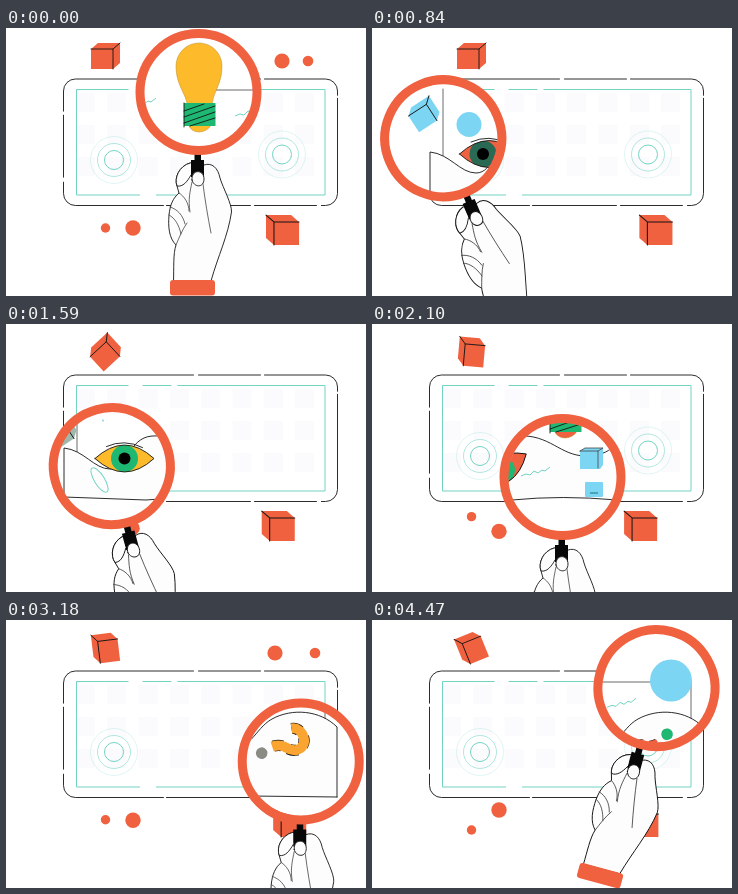
An HTML page that plays this animation: 360x268 px, repeating every 4.5 s.

```html
<!DOCTYPE html>
<html lang="en">
<head>
<meta charset="utf-8">
<title>Magnifier search</title>
<style>
html, body { margin: 0; width: 100%; height: 100%; overflow: hidden; background: #fff; }
svg { display: block; width: 100%; height: 100%; }
.ink { fill: none; stroke: #151515; stroke-width: .9; stroke-linecap: round; stroke-linejoin: round; }
.soft { stroke: #444; stroke-width: .8; }
.teal { fill: none; stroke: #72d3c3; stroke-width: 1; }
.skin { fill: #fdfdfe; }
.red { fill: #f0613f; }
.blue { fill: #7cd5f3; }
</style>
</head>
<body>
<svg viewBox="0 0 360 268">
  <defs>
    <clipPath id="lensClip"><circle id="clipDisc" r="54.5"/></clipPath>
    <path id="almond" d="M-29.5 0Q0-27 29.5 0Q0 27-29.5 0Z"/>
    <clipPath id="eyeClip"><use href="#almond"/></clipPath>
    <path id="cubeBody" d="M-14.5-7L-7.5-13H14.5V7L7.5 13H-14.5Z"/>
    <path id="cubeEdges" class="ink" d="M-14.5-7H7.5V13M7.5-7L14.5-13"/>
    <path id="wiggle" class="teal" d="M0 5L5 3L9 4L13 0L17 2L21-1L24 0L29-4"/>
    <path id="curl" d="M-14-14C-12-26 9-26 8-12C7-2-3-4-3 10"/>
  </defs>

  <g id="tiles" fill="#fbfbfd"></g>
  <rect class="ink" x="57.5" y="51" width="274" height="126.500" rx="12" stroke-dasharray="118 5 62 4 84 3"/>
  <rect class="teal" x="70.5" y="61.5" width="248.500" height="105.500" stroke-dasharray="52 14 29 6 422 16 170 0"/>
  <g id="rings"></g>

  <g id="dots" class="red"></g>
  <g id="cubeA"><use href="#cubeBody" class="red"/><use href="#cubeEdges"/></g>
  <g id="cubeB"><g transform="scale(-1.14 1.15)"><use href="#cubeBody" class="red"/><use href="#cubeEdges"/></g></g>

  <g clip-path="url(#lensClip)">
    <rect width="360" height="268" fill="#fff"/>
    <path class="ink soft" d="M205 62H280M290 62H319V167M71 167V61"/>
    <use href="#wiggle" x="121" y="74"/>
    <use id="wave" href="#wiggle"/>
    <path class="ink skin" d="M58 173V124C78 126 88 145 104 145C122 145 122 114 146 112C178 110 188 132 214 132C246 132 248 109 266 99C286 88 314 90 331 107V177"/>
    <path class="ink" d="M58 173L140 176Q190 171 245 176L331 177"/>
    <use id="waveLow" href="#wiggle" x="149" y="147"/>
    <ellipse id="loop" class="teal" rx="5" ry="14" transform="translate(93.5 156) rotate(-32)"/>
    <g id="cubeC"><use id="cubeFill" href="#cubeBody"/><use href="#cubeEdges"/></g>
    <circle id="disc" class="blue" cx="97" cy="96.5"/>
    <circle class="blue" cx="299" cy="60.5" r="21"/>

    <g id="bulb">
      <path id="glass" d="M182 80C180 64 170 58 170 38A23 23 0 0 1 216 38C216 58 206 64 206 80V96Q201 104 193 104Q185 104 182 96Z" stroke="#b98a28" stroke-width=".5"/>
      <rect x="178" y="75" width="31.500" height="23" fill="#1eb872"/>
      <path class="ink" d="M178 83L198 76M178 89L209 78M178 95L209 84M184 98L209 90M178 75V99"/>
    </g>

    <g id="eye">
      <use id="white" href="#almond"/>
      <g clip-path="url(#eyeClip)"><g id="gaze"><circle id="iris" r="13.500"/><circle r="6"/></g></g>
      <use href="#almond" class="ink"/>
      <path class="ink" d="M-18-12Q0-20 18-11"/>
    </g>

    <g transform="translate(220 135)">
      <path class="blue" d="M-12-8L-7-11H11V6L8 10H-12Z"/>
      <path class="ink soft" d="M-12-8H6V9M6-8L11-11H-7L-12-8"/>
    </g>
    <g id="box"><rect class="blue" x="-9" y="-7.500" width="18" height="15" rx="1"/><path class="teal" d="M-4 3.500H4" style="stroke:#177"/></g>

    <g id="ask" fill="none">
      <use href="#curl" stroke="#151515" stroke-width="11.200" stroke-dasharray="9 7"/>
      <use id="hook" href="#curl" stroke-width="10"/>
      <circle id="point" cy="22" r="5.800"/>
    </g>
  </g>

  <!-- Drawn upright with the lens centre at 192 64. -->
  <g id="tool">
    <path class="ink skin" d="M198 137C206 134 212 140 214 150C217 160 226 176 225.5 184C222 208 212 228 205 253H167.500C168 240 167 226 170 217C163 210 162 199 163 187C164 177 167 170 173 165L171 158C168 150 173 138 184 135Z"/>
    <path d="M188.500 126H195V132H198V149H185V132H188.500Z" fill="#080808"/>
    <path class="ink skin" d="M184 135C173 138 168 150 171 158C177 159 181 154 185 147"/>
    <path class="ink skin" d="M186 152C185 141 198 141 198 151C198 160 188 160 186 152Z"/>
    <path class="ink soft" d="M186 154C184 164 182 171 184 184M197 156C199 172 202 190 205 205M173 165C178 168 183 175 183 183M163 187C169 190 173 197 175 206M164 179C171 181 177 187 179 196M181 195C176 202 173 210 170 217M167 253H205"/>
    <rect class="red" x="164" y="252" width="45" height="15.500" rx="3"/>
    <circle cx="192.500" cy="64" r="58.500" fill="none" stroke="#f0613f" stroke-width="9"/>
  </g>
</svg>
<script>
const LOOP = 4500;
const RED = [240, 97, 63], YELLOW = [253, 187, 44], GREEN = [30, 184, 114];
const PINE = [42, 105, 84], BLUE = [124, 213, 243], GREY = [136, 140, 130];

const $ = id => document.getElementById(id);
const set = (id, name, value) => $(id).setAttribute(name, value);
const place = (id, x, y, turn = 0, size = 1) =>
  set(id, "transform", `translate(${x} ${y}) rotate(${turn}) scale(${size})`);
const lerp = (a, b, k) => a + (b - a) * k;
const mix = (a, b, k) => `rgb(${a.map((v, i) => Math.round(lerp(v, b[i], k)))})`;
const ease = u => u < .5 ? 4 * u ** 3 : 1 - 4 * (1 - u) ** 3;
const ramp = (t, from, to) => ease(Math.min(1, Math.max(0, (t - from) / (to - from))));

// Resting poses of the magnifier: time, x, y, tilt.
const stops = [
  [100, 192, 64, 0], [960, 69.5, 111, -23], [1200, 64, 137, -22], [2100, 190, 153, 0],
  [2220, 190, 153, 0], [3100, 294, 141.5, 0], [3400, 297, 141.5, 0], [3920, 291, 70, 3], [4470, 284, 68, 15]
];

function pose(t) {
  const i = Math.max(1, stops.findIndex(s => s[0] >= t));
  const a = stops[i - 1], b = stops[i];
  const k = t > LOOP - 30 ? 1 : ramp(t, a[0], b[0]);
  return t > LOOP - 30 ? stops[stops.length - 1].slice(1) : [1, 2, 3].map(n => lerp(a[n], b[n], k));
}

for (let i = 0; i < 24; i++) {
  const x = 70 + (i % 8) * 31.3, y = 65 + Math.floor(i / 8) * 32;
  $("tiles").innerHTML += `<rect x="${x}" y="${y}" width="19" height="19"/>`;
}
for (const id of ["ringL", "ringR"]) {
  $("rings").innerHTML += `<g id="${id}" class="teal"><circle r="9.5"/>`
    + `<circle r="16.5" opacity=".55"/><circle r="23.5" opacity=".22"/></g>`;
}
for (const [id, r] of [["leftSmall", 4.7], ["leftBig", 7.7], ["rightBig", 7.6], ["rightSmall", 5.3]]) {
  $("dots").innerHTML += `<circle id="${id}" r="${r}"/>`;
}

function drawStage(t) {
  place("cubeA", 99.5, 28, -85 * ramp(t, 1080, 2100) - 27 * ramp(t, 2700, 3700));
  place("cubeB", 276.5 + 8 * Math.sin(2 * Math.PI * t / 2700), 202);

  const gone = ramp(t, 400, 750);
  const left = 1 - gone + ramp(t, 1350, 1700), right = 1 - gone + ramp(t, 2200, 2550);
  const bob = 10 * ramp(t, 800, 1600) * Math.cos(2 * Math.PI * (t - 1900) / 1700);
  const shift = 7 * gone;
  place("leftSmall", 99.5, 200 - bob, 0, left);
  place("leftBig", 127, 200 + bob, 0, left);
  place("rightBig", 276 - shift, 33, 0, right);
  place("rightSmall", 302 + shift, 33, 0, right);

  const ring = 1 - ramp(t, 900, 1300) + ramp(t, 1700, 2000);
  place("ringL", 108, 132, 0, ring);
  place("ringR", 276, 126.5, 0, ring);
}

function drawHidden(t) {
  const drift = 10 * ramp(t, 3600, 4500);
  place("wave", t < 1800 ? 229 : 245 - drift, t < 1800 ? 83 : 79 + drift / 3);
  set("waveLow", "opacity", ramp(t, 1600, 1900));
  set("loop", "opacity", ramp(t, 1100, 1500));

  const fade = ramp(t, 900, 1590);
  place("cubeC", 52 + 3 * fade, 86 + 22 * fade, -33, .97);
  set("cubeFill", "fill", mix(BLUE, [158, 184, 174], fade));
  set("disc", "r", lerp(12.5, 1, fade));

  place("bulb", 0, 10 * ramp(t, 600, 1500));
  set("glass", "fill", mix(YELLOW, RED, ramp(t, 500, 900)));

  const open = ramp(t, 900, 1500), leave = ramp(t, 1600, 2080);
  place("eye", 117 + 1.5 * open + 11 * leave, 126 + 8.5 * open + 11.5 * leave, -33 * leave);
  place("gaze", -6 * (1 - open), 0);
  set("white", "fill", mix(RED, YELLOW, open - leave));
  set("iris", "fill", mix(PINE, GREEN, open));

  place("box", 222, 165.5 - 8 * ramp(t, 2150, 2600));
  place("ask", 276.6, 126.2, 9 + 108 * ramp(t, 2600, 3700) + 120 * ramp(t, 3720, 4470));
  set("hook", "stroke", mix(RED, YELLOW, ramp(t, 2700, 3500) - ramp(t, 3850, 4300)));
  set("point", "fill", mix(GREY, GREEN, ramp(t, 3720, 4300)));
}

function draw(t) {
  const [x, y, tilt] = pose(t);
  set("clipDisc", "cx", x + .5);
  set("clipDisc", "cy", y);
  set("tool", "transform", `translate(${x} ${y}) rotate(${tilt}) translate(-192 -64)`);
  drawStage(t);
  drawHidden(t);
}

function tick() {
  draw(performance.now() % LOOP);
  requestAnimationFrame(tick);
}
tick();
</script>
</body>
</html>
```
